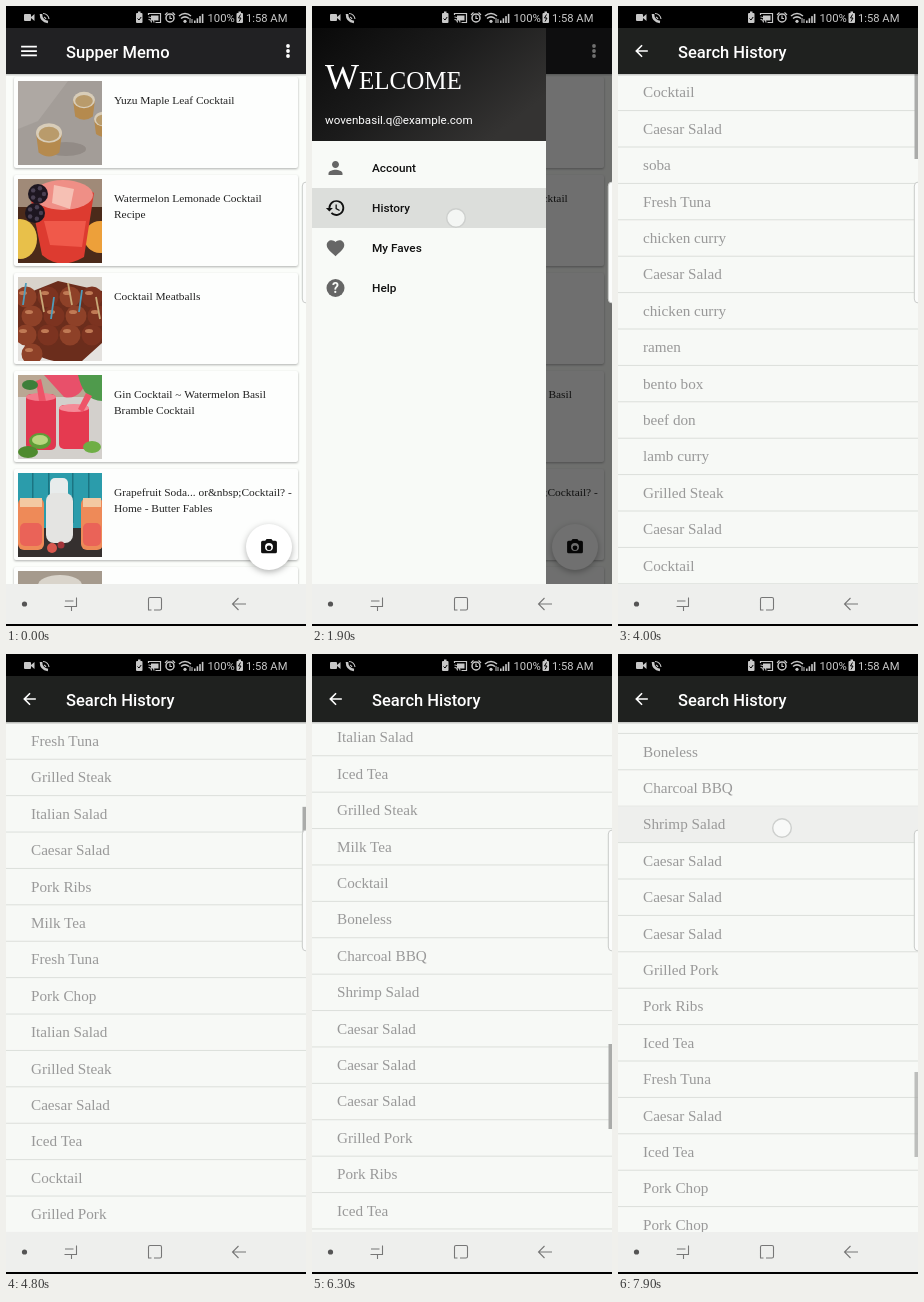
Write an HTML page that moves like this. It is 300x620 px and loops after 8 s.

```html
<!DOCTYPE html>
<html lang="en">
<head>
<meta charset="utf-8">
<title>Recipe app</title>
<style>
  html, body { margin: 0; width: 100%; height: 100%; overflow: hidden; background: #000; }
  svg { display: block; }
  text { font-family: Roboto, sans-serif; white-space: pre; }
  .serif { font-family: "Liberation Serif", serif; }
  .title { font-size: 16.5px; font-weight: 500; fill: #fff; }
  .card { fill: #fdfefd; filter: drop-shadow(0 1px 1px rgba(0, 0, 0, .3)); }
  .fab { fill: #fff; filter: drop-shadow(0 2px 3px rgba(0, 0, 0, .3)); }
  .line { fill: none; stroke: #777; stroke-width: 1.1; }
</style>
</head>
<body>
<svg id="stage" width="300" height="620" viewBox="0 0 300 620"></svg>
<script>
const LOOP = 8000, TICK = 100, ROW = 36.4, TOP = 68, DRAWER = 234;

const rect = (x, y, w, h, fill, more = '') =>
  `<rect x="${x}" y="${y}" width="${w}" height="${h}" fill="${fill}" ${more}/>`;
const dot = (x, y, r, fill, more = '') =>
  `<circle cx="${x}" cy="${y}" r="${r}" fill="${fill}" ${more}/>`;
const oval = (x, y, rx, ry, fill) =>
  `<ellipse cx="${x}" cy="${y}" rx="${rx}" ry="${ry}" fill="${fill}"/>`;
const path = (d, fill, more = '') => `<path d="${d}" fill="${fill}" ${more}/>`;
const stroke = (d, color, w = 1) => path(d, 'none', `stroke="${color}" stroke-width="${w}"`);
const text = (x, y, s, size, fill, more = '') =>
  `<text x="${x}" y="${y}" font-size="${size}" fill="${fill}" ${more}>${s}</text>`;
const serif = (x, y, s, size, fill) => text(x, y, s, size, fill, 'class="serif"');
const title = s => `<text x="60" y="51.5" class="title">${s}</text>`;
const group = (id, body, more = '') => `<g id="${id}" ${more}>${body}</g>`;

// 24-unit icons, placed by their centre
const ICONS = {
  menu: 'M3 18h18v-2H3v2zm0-5h18v-2H3v2zm0-7v2h18V6H3z',
  back: 'M20 11H7.83l5.59-5.59L12 4l-8 8 8 8 1.41-1.41L7.83 13H20v-2z',
  person: 'M12 12c2.21 0 4-1.79 4-4s-1.79-4-4-4-4 1.79-4 4 1.79 4 4 4zm0 2c-2.67 0-8 1.34-8 4v2h16v-2c0-2.66-5.33-4-8-4z',
  history: 'M13 3c-4.97 0-9 4.03-9 9H1l4 4 4-4H6a7 7 0 1 1 2.06 4.94l-1.42 1.42A9 9 0 1 0 13 3zm-1 5v5l4.28 2.54.72-1.21-3.5-2.08V8z',
  heart: 'M12 21.35l-1.45-1.32C5.4 15.36 2 12.28 2 8.5 2 5.42 4.42 3 7.5 3c1.74 0 3.41.81 4.5 2.09C13.09 3.81 14.76 3 16.5 3 19.58 3 22 5.42 22 8.5c0 3.78-3.4 6.86-8.55 11.54z',
  camera: 'M9 2L7.17 4H4a2 2 0 0 0-2 2v12a2 2 0 0 0 2 2h16a2 2 0 0 0 2-2V6a2 2 0 0 0-2-2h-3.17L15 2zm3 15a5 5 0 1 1 0-10 5 5 0 0 1 0 10z'
};
const icon = (name, x, y, size, fill, more = '') => {
  const k = size / 24;
  return path(ICONS[name], fill, `transform="translate(${x - size / 2} ${y - size / 2}) scale(${k})" ${more}`);
};

// ---- recipe pictures, 84 x 84 each ----
const cup = (x, y, r) =>
  path(`M${x - r} ${y}h${2 * r}l-${r * .2} ${r * 1.5}q-${r * .8} ${r * .6}-${r * 1.6} 0z`, '#b58a4e') +
  oval(x, y, r, r * .75, '#d8cdb9') + oval(x, y + 1, r * .8, r * .55, '#b99b6b');
const tumbler = (x, y, w, h, fill, top) =>
  rect(x, y, w, h, fill, 'rx="5"') + oval(x + w / 2, y + 3, w / 2, 4, top);

const mapleCups = () => rect(0, 0, 84, 84, '#a39d98') +
  path('M0 0h50L20 40 0 48z', '#aea8a3') + oval(48, 68, 20, 7, '#928b86') +
  cup(66, 19, 11) + cup(31, 52, 13) + cup(86, 38, 10);

const lemonade = () => rect(0, 0, 84, 84, '#4b2a1a') + rect(0, 0, 84, 28, '#a08a78') +
  oval(2, 60, 17, 20, '#e8c04a') + oval(82, 58, 16, 16, '#eda03a') +
  path('M12 16Q42-12 76 14L66 78Q42 92 24 76z', '#dd3b30') +
  oval(45, 16, 30, 15, '#ef8f86') + path('M36 6l20 4-4 20-18-6z', '#f6c0b4') +
  path('M26 42h42l-4 26-32-2z', '#f0594a') +
  [[20, 15], [17, 34]].map(([x, y]) => dot(x, y, 10, '#1d1620') +
    [0, 1, 2, 3, 4].map(i => dot(x + 6 * Math.cos(i * 1.26), y + 6 * Math.sin(i * 1.26), 2.2, '#494052')).join('')).join('');

const meatballs = () => {
  let s = rect(0, 0, 84, 84, '#6b2d1c') + path('M0 0h84v14L40 4 0 20z', '#d8d3cb') +
    path('M0 60Q14 80 36 84H0zM84 66L64 84h20z', '#e4e2df');
  for (let i = 0; i < 13; i++) {
    const x = 8 + i % 4 * 22 + (i >> 2) % 2 * 6, y = 20 + (i >> 2) * 19;
    s += dot(x, y, 10.5, i % 2 ? '#7c3320' : '#8e4128') + oval(x - 3, y - 4, 4, 2, '#c07a55');
  }
  for (let i = 0; i < 6; i++)
    s += stroke(`M${8 + i * 14} ${6 + i % 3 * 7}l${i % 2 ? 4 : -3} 22`, i % 2 ? '#c8a877' : '#4f9cba', 1.8);
  return s;
};

const bramble = () => rect(0, 0, 84, 84, '#d3d0cc') + rect(0, 0, 84, 22, '#b9a793') +
  path('M26 0h44q-6 26-24 22z', '#e8506a') + path('M60 0h24v26q-18 0-24-26z', '#4f9a4c') +
  tumbler(8, 19, 30, 56, '#e0374f', '#f37b8b') + tumbler(41, 30, 30, 44, '#e53a50', '#f58a97') +
  path('M18 6l5-2 5 22h-7zM68 18l6 3-9 16-5-3z', '#ee5468') +
  oval(12, 10, 8, 5, '#3d7f3a') + oval(22, 66, 11, 8, '#5f9e37') + oval(22, 65, 8, 5, '#b9d77e') +
  oval(10, 77, 10, 6, '#4e8a2e') + oval(74, 72, 9, 6, '#6fae45');

const soda = () => rect(0, 0, 84, 84, '#2b9cab') +
  [14, 30, 54, 70].map(x => rect(x, 0, 1.5, 50, '#1b7482')).join('') +
  rect(0, 55, 84, 29, '#35302f') + rect(32, 5, 18, 22, '#e8ecec', 'rx="5"') +
  rect(28, 20, 27, 50, '#e4e4e2', 'rx="8"') +
  [[0, 26], [63, 22]].map(([x, w]) => rect(x, 25, w, 52, '#ee8a58', 'rx="6"') +
    rect(x + 2, 50, w - 4, 23, '#ea6358', 'rx="5"') + rect(x + 2, 25, w - 4, 9, '#f3c9a2')).join('') +
  dot(34, 75, 5, '#d8574e') + dot(43, 72, 3.5, '#a2343a');

const board = () => rect(0, 0, 84, 84, '#a59a8d') + oval(42, 14, 22, 10, '#d9d4cb');

const CARDS = [
  [mapleCups, 'Yuzu Maple Leaf Cocktail'],
  [lemonade, 'Watermelon Lemonade Cocktail', 'Recipe'],
  [meatballs, 'Cocktail Meatballs'],
  [bramble, 'Gin Cocktail ~ Watermelon Basil', 'Bramble Cocktail'],
  [soda, 'Grapefruit Soda... or&amp;nbsp;Cocktail? -', 'Home - Butter Fables'],
  [board]
];
const card = ([draw, ...lines], i) => {
  const y = 75 + i * 98;
  return `<rect class="card" x="8" y="${y - 4}" width="284" height="91" rx="2"/>` +
    `<svg x="12" y="${y}" width="84" height="84">${draw()}</svg>` +
    lines.map((s, n) => serif(108, y + 23 + n * 16, s, 11.4, '#222')).join('');
};

const bar = (fill, body) => rect(0, 22, 300, 46, fill) + rect(0, 68, 300, 1.5, 'rgba(0,0,0,.18)') + body;

const home = group('home', rect(0, 22, 320, 556, '#fbfdfa') + CARDS.map(card).join('') +
  '<circle class="fab" cx="263" cy="541" r="23"/>' +
  icon('camera', 263, 541, 19, '#111') + dot(263, 541.8, 2.4, '#111') +
  bar('#212123', icon('menu', 23, 45, 21, '#fff') + title('Supper Memo') +
    [40, 45, 50].map(y => dot(282, y, 1.9, '#fff')).join('')));

// ---- drawer ----
const ITEMS = ['Account', 'History', 'My Faves', 'Help'];
const GLYPHS = ['person', 'history', 'heart'];
const drawer = group('drawer', rect(0, 22, DRAWER, 556, '#f8faf7') +
  rect(0, 22, DRAWER, 113, 'url(#night)') +
  text(13, 83, 'Welcome', 36, '#fff', 'class="serif" font-variant="small-caps"') +
  text(13, 118, 'wovenbasil.q@example.com', 11.6, '#fff') +
  rect(0, 182, DRAWER, 40, '#dcdedb', 'id="press"') +
  ITEMS.map((s, i) => {
    const y = 162 + i * 40;
    const mark = GLYPHS[i]
      ? icon(GLYPHS[i], 23.5, y, 21, '#666', `id="${GLYPHS[i]}"`)
      : dot(23.5, y, 9, '#666') + text(23.5, y + 5, '?', 14, '#f8faf7', 'font-weight="700" text-anchor="middle"');
    return mark + text(60, y + 4, s, 11.8, '#111', 'font-weight="500"');
  }).join(''));

// ---- search history ----
const FOODS = ['Cocktail', 'Caesar Salad', 'soba', 'Fresh Tuna', 'chicken curry', 'ramen', 'bento box',
  'beef don', 'lamb curry', 'Grilled Steak', 'Pork Ribs', 'Italian Salad', 'Milk Tea', 'Pork Chop',
  'Boneless', 'Charcoal BBQ', 'Shrimp Salad', 'Grilled Pork', 'Iced Tea'];
const ORDER = 'abcdebefghijba' + 'djlbkmdnljbsardlnbmjd' + 'kbdljbmljdblnl' + 'bdnkls' + 'jmaopqbbbrksdbsnn' + 'ld';
const PRESSED = 60;
const rows = [...ORDER].map((c, i) => {
  const y = 86.3 + i * ROW;
  return (i === PRESSED ? rect(0, y - 18, 300, ROW, '#eeefed', 'id="pick"') : '') +
    serif(25, y + 5, FOODS[c.charCodeAt(0) - 97], 15.2, '#999') +
    rect(0, y + 17.8, 300, 1, '#dcdfdb');
}).join('');

const history = group('page', rect(0, 22, 300, 556, '#fbfdfa') +
  group('list', rect(0, TOP, 300, 510, '#f7f9f6') + group('rows', rows) +
    rect(296.5, TOP, 3.5, 85, '#aaaba9', 'id="thumb"')) +
  bar('#1f211f', icon('back', 23.5, 45, 19, '#fff') + title('Search History')));

// ---- system bars ----
const G = '#c8c8c8';
const battery = x => rect(x, 7, 6.5, 10, G, 'rx="1"') + rect(x + 2, 5.5, 2.5, 2, G);
const status = rect(0, 0, 300, 22, '#000') +
  rect(18, 8, 7, 7, G, 'rx="1"') + path('M25 11l3.5-3v7L25 12z', G) +
  stroke('M35 8q0 7 7 8', G, 2.6) + stroke('M38 11a3.5 3.5 0 0 1 2 2M37 7.5a6 6 0 0 1 6 5.5', G, 1.1) +
  battery(130) + stroke('M131.5 12.5l1.5 1.5 2.2-3', '#000') +
  stroke('M142.5 9V7.5h12v9h-5', G, 1.2) + rect(145, 9.5, 7.5, 5, G) +
  stroke('M142.5 11a5.5 5.5 0 0 1 5.5 5.5M142.5 13.5a3 3 0 0 1 3 3', G, 1.1) +
  dot(164, 12, 4, 'none', `stroke="${G}" stroke-width="1.5"`) +
  stroke('M164 9.5v3h2M159 9l2.5-2.5M169 9l-2.5-2.5', G, 1.2) +
  stroke('M173 10q6-5 12 0M175 12.5q4-3.3 8 0', G, 1.5) + dot(179, 15.3, 1.6, G) +
  stroke('M184 12v5M186 17v-4', G, 1) +
  [0, 1, 2, 3].map(i => rect(188 + i * 2.6, 14.5 - i * 2.2, 1.6, 2.5 + i * 2.2, G)).join('') +
  text(201.5, 16, '100%', 11.3, G) + battery(230.5) + stroke('M234.5 8.5l-2 3.5h2.5l-2 3.5', '#000') +
  text(240, 16, '1:58 AM', 11.2, G);

const nav = rect(0, 578, 300, 40, '#eeefed') + rect(0, 618, 300, 2, '#000') +
  dot(18.5, 598, 2.6, '#555') +
  '<path class="line" d="M70.5 591.5v9h-6M59 595h8.5M58.5 600.5h7v4.5M148 604h6q1.500 0 1.500-1.500v-9.500q0-1.500-1.500-1.500h-10q-1.500 0-1.500 1.500v11h3M240 598h-13M232.500 592l-6 6 6 6"/>';

const edge = rect(296.3, 176, 8, 121, '#fbfcfb', 'rx="4" stroke="#c9cbc9"');
const finger = dot(0, 0, 9.3, 'rgba(250,251,250,.8)', 'id="finger" stroke="#cdcfcd" stroke-width="1.4"');

document.getElementById('stage').innerHTML =
  `<defs><linearGradient id="night" x1="0" y1="0" x2="1" y2=".6">
    <stop offset="0" stop-color="#090909"/><stop offset=".5" stop-color="#1b1b1b"/>
    <stop offset="1" stop-color="#343332"/></linearGradient></defs>` +
  home + rect(0, 22, 300, 556, '#000', 'id="shade"') + drawer + history + status + nav + edge + finger;

// ---- motion ----
const $ = id => document.getElementById(id);
const part = {};
for (const id of ['home', 'shade', 'drawer', 'press', 'history', 'page', 'list', 'rows', 'thumb', 'pick', 'finger'])
  part[id] = $(id);

const clamp = u => Math.min(1, Math.max(0, u));
const out = u => 1 - (1 - u) ** 3;
const inOut4 = u => u < .5 ? 8 * u ** 4 : 1 - 8 * (1 - u) ** 4;
const soft = u => u * u * (3 - 2 * u);
const ramp = (t, start, length, ease) => ease(clamp((t - start) / length));

// start, length, distance, easing
const SWIPES = [
  [4250, 1000, 560, out],
  [4950, 1100, 749, out],
  [5800, 900, 683, out],
  [6800, 700, 108, soft]
];
// from, to, x, y, travel, easing
const TOUCHES = [
  [800, 1000, 23, 45, 0],
  [1900, 2100, 144, 212, 0],
  [4200, 4500, 222, 430, -130],
  [4900, 5200, 222, 430, -130],
  [5800, 6100, 222, 430, -130],
  [6800, 7500, 224, 279, -108, soft],
  [7700, 8000, 164, 174, 0]
];

const move = (el, x, y) => el.setAttribute('transform', `translate(${x} ${y})`);
const show = (el, on) => el.setAttribute('visibility', on ? 'inherit' : 'hidden');

function draw(t) {
  const open = ramp(t, 850, 450, out) - ramp(t, 1980, 320, out);
  move(part.drawer, -DRAWER * (1 - open), 0);
  part.shade.setAttribute('opacity', .56 * open);
  const pressed = t >= 1900;
  show(part.press, pressed);
  part.history.setAttribute('fill', pressed ? '#111' : '#666');

  const enter = ramp(t, 2215, 500, inOut4);
  move(part.home, -10 * enter, 0);
  move(part.page, 300 * (1 - enter), 0);
  show(part.list, t >= 4000);

  const scroll = SWIPES.reduce((sum, [start, length, d, ease]) => sum + d * ramp(t, start, length, ease), 0);
  move(part.rows, 0, -scroll);
  move(part.thumb, 0, scroll / 6);
  part.thumb.setAttribute('opacity', 1 - .25 * clamp((t - 7600) / 300));
  show(part.pick, t >= 7800);

  const touch = TOUCHES.find(([from, to]) => t >= from && t < to);
  show(part.finger, touch);
  if (touch) {
    const [from, to, x, y, travel, ease = u => u] = touch;
    move(part.finger, x, y + travel * ramp(t, from, to - from, ease));
  }
}

function loop() {
  const t = performance.now() % LOOP;
  draw(Math.floor(t / TICK) * TICK);
  requestAnimationFrame(loop);
}
loop();
</script>
</body>
</html>
```
